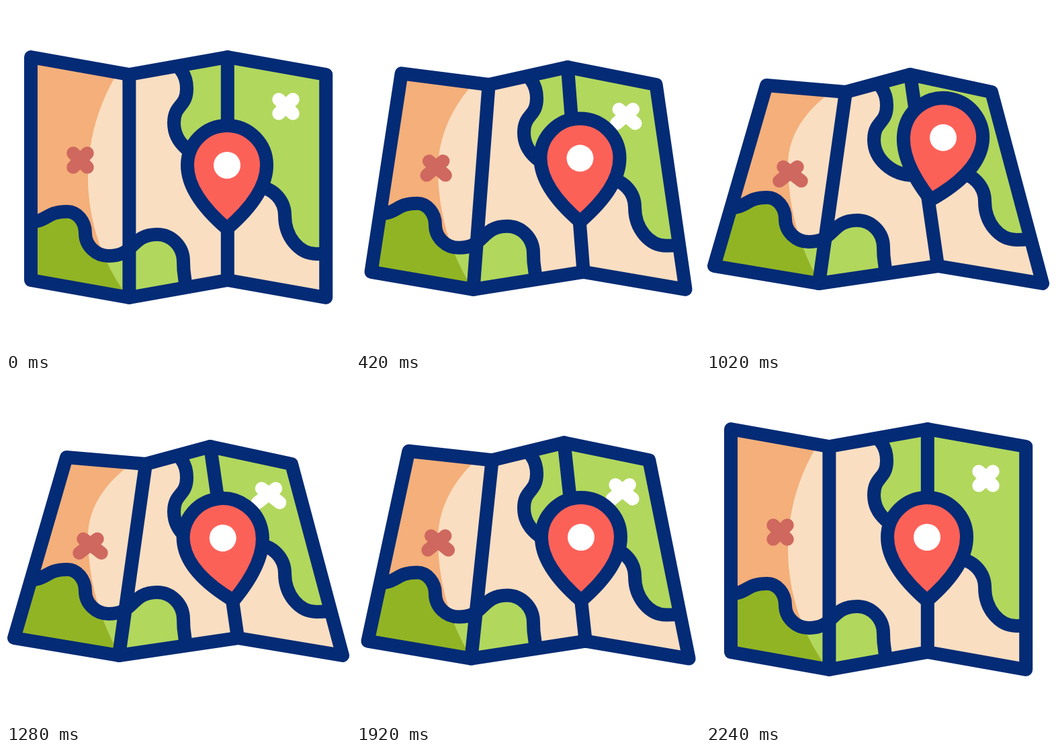
An HTML page with a canvas that plays this animation: 512x512 px, repeating every 2.4 s.

```html
<!DOCTYPE html>
<html>
<head>
<meta charset="utf-8">
<title>Folding map</title>
<style>
  html, body { margin: 0; width: 100%; height: 100%; overflow: hidden; background: #fff; }
  canvas { display: block; }
</style>
</head>
<body>
<canvas id="stage" width="512" height="512"></canvas>
<script>
const ctx = document.getElementById('stage').getContext('2d');
const NAVY = '#042b75', CREAM = '#fadec1', ORANGE = '#f4af7a', GREEN = '#b1d75d',
      MOSS = '#91b425', RED = '#fc6158', ROSE = '#cf685f';
const LOOP = 2400;

// Where the folds end when the map lies tilted
const TILTED_TOP = [90, 208, 304, 425], TILTED_BOTTOM = [12, 168, 345, 501];

// River turning points, each with a horizontal or vertical tangent
const UPPER = [[243, 86, 'h'], [269, 123, 'v'], [250, 174, 'v'], [310, 227, 'h'],
               [375, 270, 'h'], [415, 312, 'v'], [462, 369, 'h'], [500, 367, 'h']];
const LOWER = [[30, 322, 'h'], [91, 306, 'h'], [118, 338, 'v'], [153, 372, 'h'],
               [225, 340, 'h'], [264, 380, 'v'], [268, 430, 'v']];

// Smooth step from 0 to 1 between two times
function ease(t, start, end) {
  const u = Math.min(1, Math.max(0, (t - start) / (end - start)));
  return u * u * (3 - 2 * u);
}

const mix = (a, b, p) => a + (b - a) * p;

function fill(path, color) {
  ctx.fillStyle = color;
  ctx.fill(path);
}

function stroke(path, color, width = 20) {
  ctx.strokeStyle = color;
  ctx.lineWidth = width;
  ctx.stroke(path);
}

function polygon(points, path = new Path2D()) {
  points.forEach(([x, y]) => path.lineTo(x, y));
  path.closePath();
  return path;
}

function segment(a, b, color, width) {
  const path = new Path2D();
  path.moveTo(...a);
  path.lineTo(...b);
  stroke(path, color, width);
}

// Upper parts slide down and lower parts slide up as the map tilts
function river(points, p) {
  const path = new Path2D();
  const pull = 0.55;
  let last;
  for (const [x, flatY, dir] of points) {
    const y = flatY + (flatY < 240 ? 25 : -21) * p;
    if (last) {
      const dx = (x - last.x) * pull, dy = (y - last.y) * pull;
      const [ax, ay] = last.dir === 'h' ? [dx, 0] : [0, dy];
      const [bx, by] = dir === 'h' ? [dx, 0] : [0, dy];
      path.bezierCurveTo(last.x + ax, last.y + ay, x - bx, y - by, x, y);
    } else {
      path.moveTo(x, y);
    }
    last = { x, y, dir };
  }
  return path;
}

// Everything left of a large round edge, which flattens at the top
function shade(p) {
  const x = 419, y = 255 - 20 * p, r = 297;
  const path = new Path2D();
  path.ellipse(x, y, r, r * (1 - 0.42 * p), 0, 1.5 * Math.PI, Math.PI, true);
  path.ellipse(x, y, r, r * (1 + 0.1 * p), 0, Math.PI, 0.5 * Math.PI, true);
  return polygon([[0, 512], [0, 0]], path);
}

// The lower arms spread as the map tilts
function cross(x, y, color, p) {
  const arm = 10.5, foot = arm + 6 * p;
  for (const side of [-1, 1])
    segment([x + side * arm, y - arm], [x - side * foot, y + arm], color, 19.5);
}

function drawMap(p) {
  const top = TILTED_TOP.map((x, i) =>
    [mix(37 + 146.4 * i, x, p), 76 + 26 * (i % 2) + (i ? 26 : 42) * p]);
  const bottom = TILTED_BOTTOM.map((x, i) =>
    [mix(37 + 146.4 * i, x, p), 408 + 26 * (i % 2) - 21 * p]);
  const sheet = polygon([...top, ...[...bottom].reverse()]);
  const upper = river(UPPER, p), lower = river(LOWER, p);
  const meadow = polygon([[268, 512], [0, 512]], new Path2D(lower));

  ctx.save();
  ctx.clip(sheet);
  fill(sheet, CREAM);
  fill(polygon([[512, 0], [243, 0]], new Path2D(upper)), GREEN);
  fill(meadow, GREEN);
  ctx.save();
  ctx.clip(shade(p));
  fill(sheet, ORANGE);
  fill(meadow, MOSS);
  ctx.restore();
  cross(110.5 + 15 * p, 229.5 + 20.5 * p, ROSE, p);
  cross(416.5 - 25.5 * p, 149.5 + 25.5 * p, '#fff', p);
  stroke(upper, NAVY);
  stroke(lower, NAVY);
  ctx.restore();

  for (const i of [1, 2]) segment(top[i], bottom[i], NAVY, 20);
  stroke(sheet, NAVY);
}

// The pin's origin is the point of its red drop
const DROP = new Path2D('M-59 -83 A59 59 0 0 1 59 -83 C59 -49 32 -16 0 11.5 C-32 -16 -59 -49 -59 -83 Z');
const HOLE = new Path2D();
HOLE.arc(0, -83, 20, 0, 2 * Math.PI);

function drawPin(x, y, degrees) {
  ctx.save();
  ctx.translate(x, y);
  ctx.rotate(degrees * Math.PI / 180);
  fill(DROP, RED);
  stroke(DROP, NAVY);
  fill(HOLE, '#fff');
  ctx.restore();
}

function draw() {
  const t = performance.now() % LOOP;
  const tilt = ease(t, 200, 600) - ease(t, 1800, 2200);
  const lift = 44 * (ease(t, 200, 900) - ease(t, 1000, 1200));
  const swing = 12 * ease(t, 600, 1000) - 22 * ease(t, 1000, 1200) + 10 * ease(t, 1200, 1950);
  ctx.clearRect(0, 0, 512, 512);
  ctx.lineJoin = ctx.lineCap = 'round';
  drawMap(tilt);
  drawPin(329 + 7.7 * tilt, 320 - lift, swing);
  requestAnimationFrame(draw);
}
draw();
</script>
</body>
</html>
```
